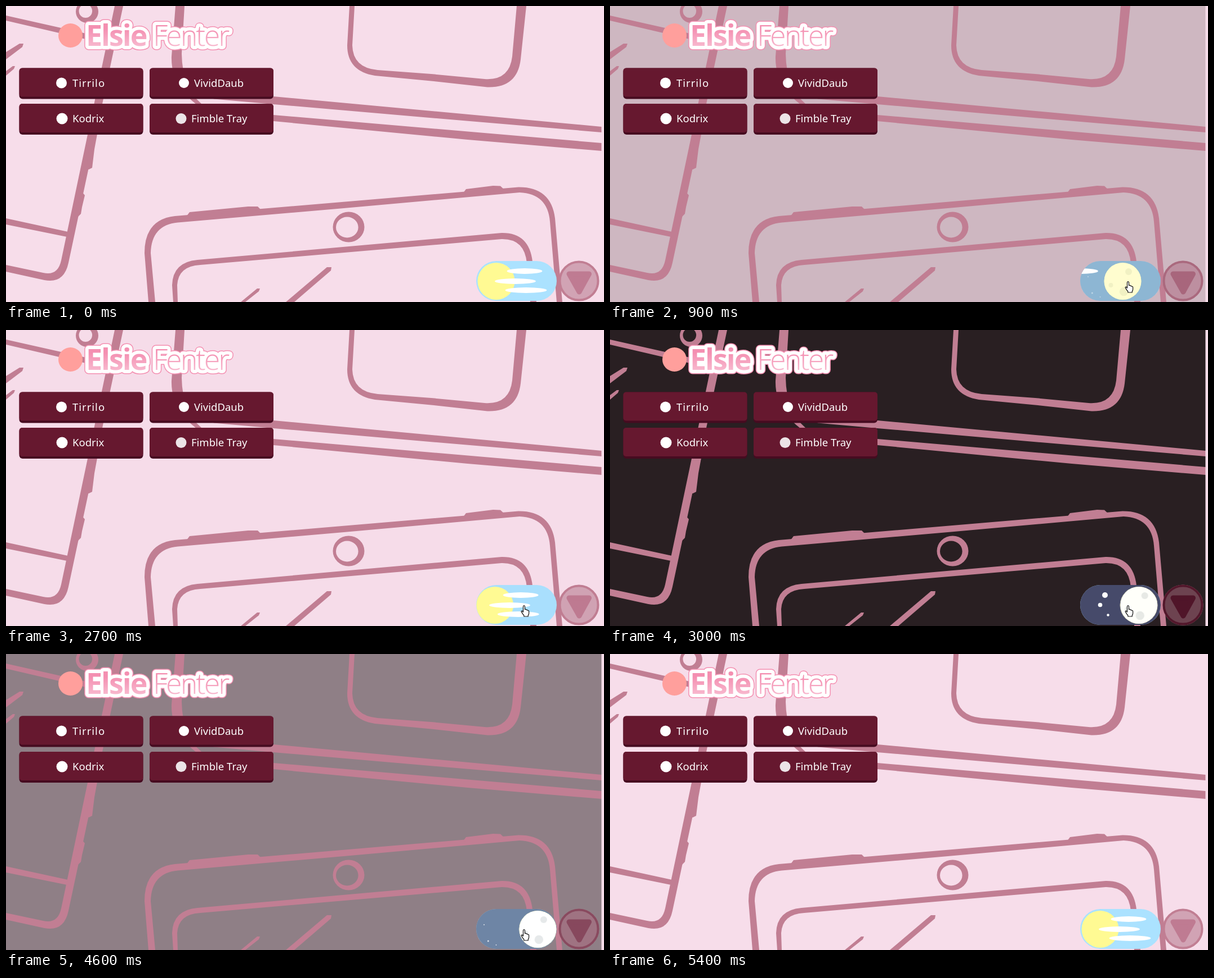
An HTML page for the animation above (7.5 s loop, 1062 by 527 pixels).

```html
<!DOCTYPE html>
<html lang="en">
<head>
<meta charset="utf-8">
<title>Day and night switch</title>
<style>
  html, body { margin: 0; width: 100%; height: 100%; overflow: hidden; background: #f7ddea; }
  svg { display: block; width: 1062px; height: 527px; }

  .line { fill: #c17e93; }
  .button { fill: #66182f; }
  .button-edge { fill: #460b20; }
  .label { font: 500 18.5px "Noto Sans", "Open Sans", sans-serif; fill: #fff; }
  .logo { font-family: "Open Sans", sans-serif; font-size: 52px; stroke-linejoin: round; }
  .first { font-weight: 700; letter-spacing: -2px; }
  .last { font-weight: 300; letter-spacing: -3px; }
  .arrow { stroke-width: 9; stroke-linejoin: round; }

  .dark, .dusk, .knob, .moon, .cloud, .stars, .specks, .speck, .hand {
    animation: 7.5s linear infinite;
  }
  .dark { animation-name: dark; animation-timing-function: ease; }
  .dusk { animation-name: dusk; animation-timing-function: ease; }
  .knob, .moon { animation-timing-function: cubic-bezier(.68, -.55, .265, 1.55); }
  .knob { animation-name: slide; }
  .moon { animation-name: moon; }
  .cloud { animation-name: drift; fill: #fff; }
  .stars { animation-name: stars; fill: #fff; }
  .specks { animation-name: specks; fill: #fff; }
  .speck { animation-name: speck; animation-delay: var(--wait, 0s); }
  .hand { animation-name: hand; }

  @keyframes dark {
    0%, 6.66% { opacity: 0; }
    6.667%, 7.96% { opacity: 1; }
    15.96%, 35.96% { opacity: 0; }
    41.49%, 58.907% { opacity: 1; }
    66.907%, 100% { opacity: 0; }
  }
  @keyframes dusk {
    0%, 6.66% { opacity: 0; }
    6.667%, 8.493% { opacity: 1; }
    16.493%, 35.867% { opacity: 0; }
    42.533%, 59.16% { opacity: 1; }
    67.16%, 100% { opacity: 0; }
  }
  @keyframes slide {
    0%, 6.66% { transform: none; }
    6.667%, 8.267% { transform: translateX(71.5px); }
    16.267%, 35.68% { transform: none; }
    42.827%, 58.827% { transform: translateX(71.5px); }
    66.827%, 100% { transform: none; }
  }
  @keyframes moon {
    0%, 6.66% { opacity: 0; }
    6.667%, 8.267% { opacity: 1; }
    16.267%, 35.68% { opacity: 0; }
    42.827%, 58.827% { opacity: 1; }
    66.827%, 100% { opacity: 0; }
  }
  @keyframes drift {
    0%, 6.66% { transform: none; }
    6.667%, 8.16% { transform: translateX(var(--away)); }
    16.16% { transform: none; }
    35.68% { transform: none; animation-timing-function: cubic-bezier(.3, .2, .7, .8); }
    41.547%, 58.827% { transform: translateX(var(--away)); }
    66.827%, 100% { transform: none; }
  }
  @keyframes stars {
    0%, 6.66% { opacity: 0; }
    6.667%, 8.16% { opacity: 1; }
    10.16%, 38% { opacity: 0; }
    39.867%, 58.827% { opacity: 1; }
    60.827%, 100% { opacity: 0; }
  }
  @keyframes specks {
    0%, 6.66% { opacity: 0; }
    6.667%, 9.76% { opacity: 1; }
    13.76%, 42% { opacity: 0; }
    43%, 60.427% { opacity: 1; }
    64.427%, 100% { opacity: 0; }
  }
  @keyframes speck {
    0%, 20% { opacity: 1; }
    24%, 46% { opacity: 0; }
    48%, 100% { opacity: 1; }
  }
  @keyframes hand {
    0%, 6.66% { transform: translate(-160px, 45px); }
    6.667%, 66.6% { transform: none; }
    69.33% { transform: translate(-65px, 18px); }
    70.667% { transform: translate(-117px, 22px); }
    71.9%, 100% { transform: translate(-160px, 45px); }
  }
</style>
</head>
<body>
<svg viewBox="0 0 1062 527" xmlns="http://www.w3.org/2000/svg">
  <defs>
    <linearGradient id="pink" gradientUnits="userSpaceOnUse" x1="0" y1="32" x2="0" y2="74">
      <stop offset="0.2" stop-color="#f48fb1"/>
      <stop offset="1" stop-color="#f8bbd0"/>
    </linearGradient>
    <clipPath id="pill"><rect x="835" y="454" width="143" height="71" rx="35.5"/></clipPath>
    <g id="name">
      <text class="first" x="142" y="71">Elsie</text>
      <text class="last" x="261" y="71">Fenter</text>
    </g>
    <g id="plate">
      <rect class="button-edge" width="220" height="55" rx="6"/>
      <rect class="button" width="220" height="51" rx="5"/>
    </g>
  </defs>

  <rect width="1062" height="527" fill="#f7ddea"/>
  <rect class="dark" width="1062" height="527" fill="#1f1719"/>

  <g class="line" fill-rule="evenodd">
    <!-- left phone -->
    <path d="M193 0H208L111 457Q103 495 68 488L0 473V461L66 475Q92 481 98 453Z"/>
    <path d="M162 228L157 255L153 288L147 291L143 290L150 228Z"/>
    <path d="M134 330L140 337L135 358L133 370L128 375L122 374Z"/>
    <path d="M0 17L182 58L180 68L0 26Z"/>
    <path d="M0 378L110 402L108 411L0 389Z"/>
    <path d="M124 10a20 20 0 0 0 40 0a20 20 0 0 0-40 0ZM129.500 9a11.800 12 0 0 0 23.600 0a11.800 12 0 0 0-23.600 0Z"/>
    <path d="M0 82L24 67L31 67L29 73L0 95Z"/>
    <path d="M0 116L12 107H16L14 112L0 124Z"/>
    <!-- upper phone -->
    <path d="M301 0H317L312 85Q313 145 347 174L475 194L1058 244V258L820 238L475 205L370 195Q292 155 294 90Z"/>
    <path d="M345 150L475 161L1058 215V225L800 203L475 175L369 165.500Z"/>
    <path d="M610 0L606 70Q606 116 655 124L760 134L855 144.500Q908 146 914 95L924 0H907L899 90Q894 133 850 130L755 121L660 114Q616 110 615 70L619 0Z"/>
    <!-- lower phone -->
    <path d="M253 527L246 440Q246 380 300 374L910 322.500Q968 322 975 378L988 527H978L966 384Q962 334 912 332L600 360L305 385.500Q258 390 257 440L265 527Z"/>
    <path d="M320 375L326 367L430 357H447L454 364Z"/>
    <path d="M811 334L817 326L865 320L878 320.500L885 327Z"/>
    <path d="M580.500 393.500a28 27 0 0 0 56 0a28 27 0 0 0-56 0ZM586 394a19.800 18.500 0 0 0 39.600 0a19.800 18.500 0 0 0-39.600 0Z"/>
    <path d="M297 527L295 497Q296 456 340 452L880 404Q929 403 935 455L942 527H931L925 458Q921 414 880 415L345 461Q306 463 304 497L305 527Z"/>
    <path d="M497 527L570 465H578L577 471L512 527Z"/>
    <path d="M417 527L446 503H451L449 508L425 527Z"/>
  </g>
  <rect x="1057.500" width="4.500" height="527" fill="#f7ddea"/>

  <!-- heading -->
  <g class="logo">
    <use href="#name" fill="#f48fb1" stroke="#f48fb1" stroke-width="15"/>
    <use href="#name" fill="#fff" stroke="#fff" stroke-width="12"/>
    <use href="#name" fill="url(#pink)"/>
  </g>
  <circle cx="114.500" cy="52.500" r="21.500" fill="#ff9f9c"/>

  <!-- links -->
  <use href="#plate" x="23.500" y="110.500"/>
  <use href="#plate" x="255" y="110.500"/>
  <use href="#plate" x="23.500" y="174"/>
  <use href="#plate" x="255" y="174"/>
  <g fill="#fff">
    <circle cx="98.500" cy="137" r="9.500"/>
    <circle cx="316" cy="137" r="9"/>
    <circle cx="99.500" cy="200.500" r="10"/>
    <circle cx="311" cy="200.500" r="9.500" fill="#ece4e7"/>
  </g>
  <g class="label">
    <text x="118" y="144" letter-spacing="1">Tirrilo</text>
    <text x="334" y="144">VividDaub</text>
    <text x="118" y="207">Kodrix</text>
    <text x="329" y="207">Fimble Tray</text>
  </g>

  <!-- day and night switch -->
  <g clip-path="url(#pill)">
    <rect x="835" y="454" width="143" height="71" fill="#abe2ff"/>
    <rect class="dusk" x="835" y="454" width="143" height="71" fill="#3b395a"/>
    <g class="stars">
      <circle cx="879" cy="472" r="5"/>
      <circle cx="870.500" cy="489.500" r="3.800"/>
      <circle cx="884.500" cy="507.500" r="2.200"/>
    </g>
    <g class="specks">
      <circle class="speck" cx="849" cy="482" r="1"/>
      <circle class="speck" cx="856.300" cy="511" r="1.500" style="--wait: .12s"/>
      <circle class="speck" cx="870.500" cy="518" r=".9" style="--wait: .35s"/>
    </g>
    <g class="knob">
      <circle cx="870.500" cy="490" r="33" fill="#fffa93"/>
      <g class="moon">
        <circle cx="870.500" cy="490" r="33" fill="#fff"/>
        <g fill="#e6e9ea">
          <circle cx="881" cy="473" r="6"/>
          <circle cx="849.500" cy="497" r="4"/>
          <circle cx="872.500" cy="508.500" r="7.700"/>
        </g>
      </g>
    </g>
    <ellipse class="cloud" cx="921" cy="472" rx="31.500" ry="5" style="--away: -165px"/>
    <ellipse class="cloud" cx="904.500" cy="490" rx="36.500" ry="5" style="--away: -240px"/>
    <ellipse class="cloud" cx="923.500" cy="506" rx="37" ry="5" style="--away: -330px"/>
  </g>

  <!-- scroll button -->
  <circle cx="1017.500" cy="489.500" r="34" fill="#d1a3b4" stroke="#c17e93" stroke-width="4"/>
  <path class="arrow" d="M1000 477H1035.500L1018 509Z" fill="#bf7b92" stroke="#bf7b92"/>
  <g class="dark">
    <circle cx="1017.500" cy="489.500" r="34" fill="#693f4c" stroke="#4d1226" stroke-width="4"/>
    <path class="arrow" d="M1000 477H1035.500L1018 509Z" fill="#4b1124" stroke="#4b1124"/>
  </g>

  <path class="hand" fill="#fff" stroke="#111" stroke-width="1.200" stroke-linejoin="round"
    d="M918.500 502V492.500Q918.500 490.600 920 490.600T921.500 492.500V497.500Q923.500 496.500 924 498.300Q926 497.600 926.400 499.300Q928.600 498.900 928.600 501V504.500Q928.600 506.500 927.300 507.700V510H919.800V508Q917.500 505.800 915.300 501.600Q914.900 499.800 916.500 500Z"/>
</svg>
</body>
</html>
```
